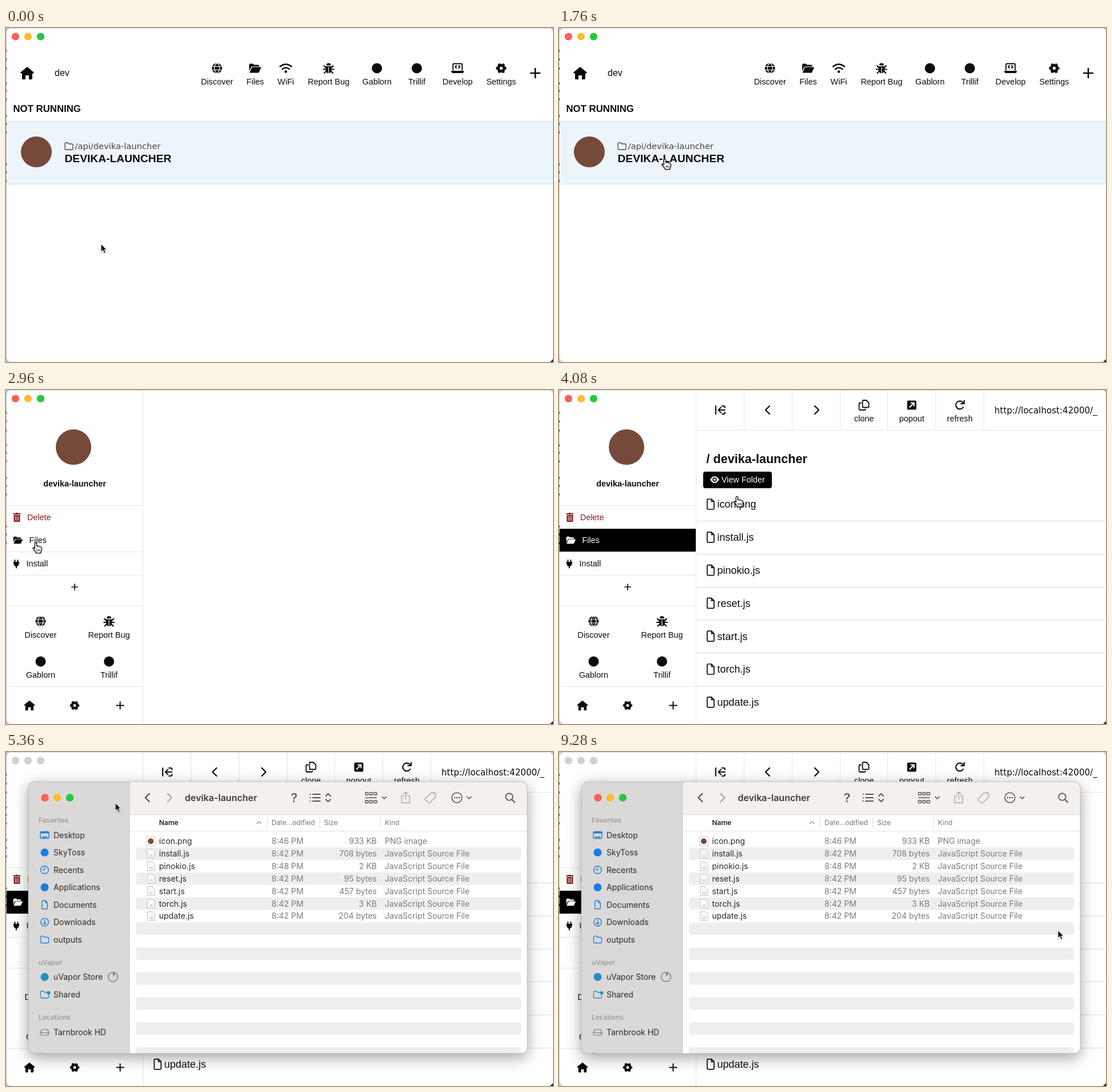
An HTML page that plays this animation: 956x585 px, repeating every 9360 ms.

```html
<!DOCTYPE html>
<html lang="en">
<head>
<meta charset="utf-8">
<title>Launcher file browser</title>
<style>
html, body { margin: 0; width: 100%; height: 100%; overflow: hidden; background: #fff; }
svg { display: block; width: 956px; height: 585px; }
text { white-space: pre; }
.ui { font-family: "Liberation Sans", Arial, sans-serif; }
.wide { font-family: "DejaVu Sans", Verdana, sans-serif; }
.mac { font-family: Inter, Roboto, sans-serif; }
#finder { filter: drop-shadow(0 7px 13px rgba(0,0,0,.36)); }
#cursor { filter: drop-shadow(0 1px 1px rgba(0,0,0,.3)); }
</style>
</head>
<body>
<svg id="stage" viewBox="0 0 956 585" xmlns="http://www.w3.org/2000/svg"></svg>
<script>
const LOOP = 9360, STEP = 80;
const INK = '#0c0c0c', RED = '#84201a', BLUE = '#1c7ce0', CYAN = '#258fc4', GRAY = '#55524f', PALE = '#aaa7a5';
const AVATAR = '#754a3a';

const fill = d => `<path d="${d}" fill="currentColor"/>`;
const line = (d, w = 2) =>
  `<path d="${d}" fill="none" stroke="currentColor" stroke-width="${w}" stroke-linecap="round" stroke-linejoin="round"/>`;
const ring = (r, w, extra = '') =>
  `<circle r="${r}" fill="none" stroke="currentColor" stroke-width="${w}" ${extra}/>`;

const FOLDER = 'M-7-4.5Q-7-6-5.5-6H-2L0-4H5.5Q7-4 7-2.5V4.5Q7 6 5.5 6H-5.5Q-7 6-7 4.5Z';
const PAGE = 'M-6-7.5Q-6-9-4.5-9H1.5L6-4.5V7.5Q6 9 4.5 9H-4.5Q-6 9-6 7.5ZM1.5-9V-4.5H6';
const icons = {
  home: fill('M0-11L12-1 10.3 1 9-.1V9.5Q9 11 7.5 11H3V4H-3V11H-7.5Q-9 11-9 9.5V-.1L-10.3 1-12-1Z'),
  globe: '<circle r="9" fill="currentColor"/><path d="M-9-3H9M-9 3H9M0-9C-6-5-6 5 0 9C6 5 6-5 0-9" fill="none" stroke="#fff" stroke-width="1.2"/>',
  open: fill('M-10.5 5V-6Q-10.5-8-8.5-8H-4L-2-6H5Q7-6 7-4V-3H-5Q-6.5-3-7.2-1.6ZM-10 8L-6-1Q-5.6-2-4.5-2H9.5Q10.8-2 10.2-.8L6.8 6.8Q6.2 8 5 8Z'),
  wifi: line('M-10-3Q0-11 10-3M-6 1.5Q0-3.5 6 1.5', 2.5) + '<circle cy="6" r="2.3" fill="currentColor"/>',
  bug: fill('M-4-5A4 4 0 0 1 4-5ZM-5-3.5H5V3A5 6 0 0 1-5 3Z') +
    line('M-5-1L-8-4.5M5-1L8-4.5M-5 2H-9M5 2H9M-4 5L-7.5 8.5M4 5L7.5 8.5') +
    '<path d="M0-2V9" stroke="#fff" stroke-width="1.2"/>',
  dot: '<circle r="9" fill="currentColor"/>',
  laptop: line('M-8 3V-6.5Q-8-8-6.5-8H6.5Q8-8 8-6.5V3M-2-4.5L-4-2.5-2-.5M2-4.5L4-2.5 2-.5', 1.9) +
    fill('M-11 4.5H11Q11 8.5 8 8.5H-8Q-11 8.5-11 4.5Z'),
  gear: ring(5.2, 4.8) + ring(7.7, 2.8, 'stroke-dasharray="4.03" stroke-dashoffset="2"'),
  plus: line('M-8 0H8M0-8V8', 2.6),
  trash: fill('M-6.5-7H-2.5L-1.5-8H1.5L2.5-7H6.5V-5H-6.5ZM-5.5-4H5.5V6.5Q5.5 8 4 8H-4Q-5.5 8-5.5 6.5Z') +
    '<path d="M-2.5-2V6M0-2V6M2.5-2V6" stroke="#fff" stroke-width=".9"/>',
  plug: line('M-2.5-6.5V-3M2.5-6.5V-3M0 3V7', 2) + fill('M-5.5-3.5H5.5V-2H4.7V0Q4.2 4.2 0 4.2T-4.7 0V-2H-5.5Z'),
  folder: line(FOLDER, 1.3),
  page: line(PAGE, 1.7),
  exit: line('M-8-7V7M-3 0H8M1-4.5L-3.5 0 1 4.5M3-7H6Q8-7 8-5V-4M3 7H6Q8 7 8 5V4', 2),
  left: line('M3.5-7L-3.5 0 3.5 7', 2.3),
  right: line('M-3.5-7L3.5 0-3.5 7', 2.3),
  down: line('M-3.5-1.5L0 2 3.5-1.5', 1.7),
  clone: line('M-2-8.5H4L8.5-4V2.5Q8.5 4 7 4H-1Q-2.5 4-2.5 2.5V-7Q-2.5-8.5-1-8.5M-5-4H-7Q-8.5-4-8.5-2.5V7Q-8.5 8.5-7 8.5H1Q2.5 8.5 2.5 7', 1.8),
  popout: '<rect x="-8" y="-8" width="16" height="16" rx="2" fill="currentColor"/><path d="M-4 4L3-3M-2-4H4V2" fill="none" stroke="#fff" stroke-width="2"/>',
  refresh: line('M6 3.5A7 7 0 1 1 5-5L7-3M7.5-8V-2.5H2', 2.1),
  eye: fill('M-8 0Q-4-6 0-6T8 0Q4 6 0 6T-8 0Z') + '<circle r="3.7" fill="#000"/><circle r="2.1" fill="currentColor"/>',
  desktop: line('M-7.5-4Q-7.5-6-5.5-6H5.5Q7.5-6 7.5-4V4Q7.5 6 5.5 6H-5.5Q-7.5 6-7.5 4Z', 1.4) + fill('M-7-5.5H7V-3H-7ZM-5 2.5H5V4.5H-5Z'),
  clock: ring(6.8, 1.4) + line('M0-4V0H-3.2', 1.3),
  fetch: ring(6.8, 1.4) + line('M0-3.5V3.5M-2.8 1L0 3.7 2.8 1', 1.3),
  disk: line('M-7.5 1L-5-4.5H5L7.5 1V4Q7.5 5.5 6 5.5H-6Q-7.5 5.5-7.5 4V1H7.5M4 3.2H5', 1.2),
  list: line('M-4-6H9M-4 0H9M-4 6H9M-8.5-6H-8M-8.5 0H-8M-8.5 6H-8', 1.8),
  updown: line('M-4-3L0-7 4-3M-4 3L0 7 4 3', 1.8),
  share: line('M-3-3H-7V9H7V-3H3M0 3V-10M-4-6.5L0-10 4-6.5', 1.5),
  tag: line('M-9 2L1-8 8.5-9 9.5-1.5-1 9Q-2 10-3 9L-9 4Q-10 3-9 2ZM5.5-5.5H5.6', 1.5),
  more: ring(8.8, 1.6) + line('M-4 0H-3.9M0 0H.1M4 0H4.1', 2.4),
  search: '<circle cx="-1.5" cy="-1.5" r="6.2" fill="none" stroke="currentColor" stroke-width="1.8"/>' + line('M3.2 3.2L8 8'),
  group: [-7, 0, 7].map(y => [-7.5, 0, 7.5].map(x => y
    ? `<rect x="${x - 2.5}" y="${y - 2.3}" width="5" height="4.6" rx="1" fill="none" stroke="currentColor" stroke-width="1.4"/>` : '').join('')).join('') +
    line('M-9.5 0H9.5', 1.3)
};

const icon = (name, x, y, scale = 1, color = INK) =>
  `<g transform="translate(${x} ${y}) scale(${scale})" color="${color}">${icons[name]}</g>`;
const text = (x, y, size, str, { font = 'ui', color = INK, anchor = 'start', weight = 400 } = {}) =>
  `<text class="${font}" x="${x}" y="${y}" font-size="${size}" fill="${color}" text-anchor="${anchor}" font-weight="${weight}">${str}</text>`;
const label = (x, y, str) => text(x, y, 14.4, str, { anchor: 'middle' });
const box = (x, y, w, h, color, r = 0) => `<rect x="${x}" y="${y}" width="${w}" height="${h}" rx="${r}" fill="${color}"/>`;
const rule = (x, y, w, color = '#e4e4e4') => box(x, y, w, 1, color);
const bar = (x, y, h, color = '#e4e4e4') => box(x, y, 1, h, color);
const disc = (x, y, r, color) => `<circle cx="${x}" cy="${y}" r="${r}" fill="${color}"/>`;
const group = (id, body) => `<g id="${id}">${body}</g>`;

function homeView() {
  const links = [['globe', 'Discover', 368.7], ['open', 'Files', 435.5], ['wifi', 'WiFi', 489], ['bug', 'Report Bug', 563.8],
    ['dot', 'Gablorn', 648.3], ['dot', 'Trillif', 718], ['laptop', 'Develop', 789.2], ['gear', 'Settings', 865.5]];
  return icon('home', 37, 79) + text(85, 84, 16, 'dev') +
    links.map(([name, str, x]) => icon(name, x, 70.5) + label(x, 99, str)).join('') +
    icon('plus', 925, 79) + text(12.5, 147, 16.8, 'NOT RUNNING', { weight: 700 }) +
    box(1, 163, 955, 111, '#ecf5fa') + rule(1, 163, 955, '#c3e2f1') + rule(1, 273, 955, '#c3e2f1') +
    disc(53, 217, 27, AVATAR) + icon('folder', 110, 207, 1, '#444') +
    text(120.5, 212, 14.65, '/api/devika-launcher', { font: 'wide', color: '#444' }) +
    text(102.5, 235, 19.2, 'DEVIKA-LAUNCHER', { weight: 700 });
}

function sideView() {
  const links = [['globe', 'Discover', 60.5, 405], ['bug', 'Report Bug', 180, 405], ['dot', 'Gablorn', 60.5, 475.5], ['dot', 'Trillif', 180, 475.5]];
  return bar(239, 0, 585) + disc(118, 100, 31, AVATAR) +
    text(120, 168.5, 14.4, 'devika-launcher', { weight: 700, anchor: 'middle' }) +
    [202, 283, 324, 378, 519].map(y => rule(1, y, 238)).join('') +
    icon('trash', 19, 223, 1, RED) + text(37, 227.5, 14.4, 'Delete', { color: RED }) +
    group('filesIdle', icon('open', 21, 263, .78) + text(40.5, 268, 14.4, 'Files')) +
    group('filesActive', box(1, 243, 238, 40, '#000') + icon('open', 21, 263, .78, '#fff') + text(40.5, 268, 14.4, 'Files', { color: '#fff' })) +
    icon('plug', 18, 304.5) + text(35.5, 309, 14.4, 'Install') + icon('plus', 120, 345, .65) +
    links.map(([name, str, x, y]) => icon(name, x, y) + label(x, y + 28.5, str)).join('') +
    icon('home', 41, 552.5, .8) + icon('gear', 120, 552.5, .9) + icon('plus', 199.5, 552.5, .78);
}

const names = ['icon.png', 'install.js', 'pinokio.js', 'reset.js', 'start.js', 'torch.js', 'update.js'];

function filesView() {
  const tools = [['clone', 533], ['popout', 616.5], ['refresh', 700.5]];
  return [323, 407, 491, 574, 658, 742].map(x => bar(x, 0, 70)).join('') + rule(240, 70, 716) +
    icon('exit', 282, 35) + icon('left', 364.5, 35) + icon('right', 450.5, 35) +
    tools.map(([name, x]) => icon(name, x, 26.5) + label(x, 55, name)).join('') +
    text(761, 40.5, 15.1, 'http://localhost:42000/_', { font: 'wide' }) +
    text(257.5, 127.5, 21.6, '/ devika-launcher', { weight: 700 }) +
    box(252, 143, 120, 29, '#000', 4) + icon('eye', 272, 157, 1, '#fff') + text(284, 162, 14.4, 'View Folder', { color: '#fff' }) +
    names.map((name, i) => {
      const y = 200 + i * 57.8;
      return icon('page', 265, y, 1) + text(276.5, y + 6.3, 18, name) + (i < 6 ? rule(240, Math.round(y + 29), 716, '#dadada') : '');
    }).join('');
}

function finderView() {
  const mac = (x, y, size, str, color = '#2b2928', opts = {}) => text(x, y, size, str, { font: 'mac', color, ...opts });
  const places = [['desktop', 'Desktop', 145.5], ['dot', 'SkyToss', 176], ['clock', 'Recents', 206.5], ['dot', 'Applications', 237],
    ['page', 'Documents', 267.5], ['fetch', 'Downloads', 298], ['folder', 'outputs', 328.5], ['dot', 'uVapor Store', 394, CYAN],
    ['folder', 'Shared', 425, CYAN], ['disk', 'Tarnbrook HD', 490.5, '#777']];
  const shrink = { dot: .78, page: .8 };
  const details = [['8:46', '933 KB'], ['8:42', '708 bytes'], ['8:48', '2 KB'], ['8:42', '95 bytes'], ['8:42', '457 bytes'], ['8:42', '3 KB'], ['8:42', '204 bytes']];
  const pitch = 21.87, stripes = [];
  for (let i = 1; i < 18; i += 2) stripes.push(box(227, 145.3 + i * pitch, 673.5, 21.9, '#efeeee', 5));

  const rows = names.map((name, i) => {
    const y = 156.2 + i * pitch, soft = '#7d7b7a';
    const mini = i ? `<path d="M247 ${y - 8}h9l4 4v12h-13z" fill="#f7f7f7" stroke="#c4c4c4"/>` + mac(253.5, y + 5.5, 5, 'JS', '#999', { anchor: 'middle' })
      : `<rect x="245.5" y="${y - 8}" width="15" height="16" fill="#fff" stroke="#ccc"/>` + disc(253, y, 5, AVATAR);
    return mini + mac(267.5, y + 5, 14, name) + mac(464, y + 5, 14, details[i][0] + ' PM', soft) +
      mac(648, y + 5, 14, details[i][1], soft, { anchor: 'end' }) + mac(662, y + 5, 14, i ? 'JavaScript Source File' : 'PNG image', soft);
  }).join('');

  return '<clipPath id="frame"><rect x="39" y="52" width="872" height="476" rx="11"/></clipPath><g clip-path="url(#frame)">' +
    box(39, 52, 872, 476, '#fff') + box(39, 52, 177, 476, '#dbd9d8') + box(216, 52, 695, 57, '#f3f0ee') + bar(215.5, 52, 476, '#cbc9c8') +
    rule(216, 109, 695, '#dddbda') + rule(216, 138, 695, '#e2e2e2') +
    disc(68, 80, 6.8, '#fe5f57') + disc(89.5, 80, 6.8, '#febc2e') + disc(111.5, 80, 6.8, '#28c840') +
    [['Favorites', 124], ['uVapor', 373], ['Locations', 469], ['Tags', 536]].map(([str, y]) => mac(57, y, 11.8, str, '#a09d9c', { weight: 600 })).join('') +
    places.map(([name, str, y, color = BLUE]) => icon(name, 67.5, y, shrink[name] || 1, color) + mac(83, y + 5, 14, str)).join('') +
    disc(74.5, 422, 3, CYAN) +
    `<g transform="translate(187 394)" color="#777">${ring(8.3, 1.4)}${fill('M0 0V-7A7 7 0 0 1 4-5.8Z')}</g>` +
    icon('left', 247, 80, 1, GRAY) + icon('right', 286, 80, 1, PALE) + mac(312.5, 86, 16, 'devika-launcher', '#3e3b39', { weight: 600 }) +
    mac(503.5, 88, 22, '?', GRAY, { anchor: 'middle', weight: 500 }) + icon('list', 540, 80, 1, GRAY) + icon('updown', 563, 80, 1, GRAY) +
    icon('group', 638, 80, 1, GRAY) + icon('down', 661, 80, 1, GRAY) + icon('share', 698.5, 80, 1, PALE) + icon('tag', 741.5, 80, 1, PALE) +
    icon('more', 788, 80, 1, GRAY) + icon('down', 809.5, 80, 1, GRAY) + icon('search', 881, 80, 1, GRAY) +
    mac(267.5, 127.5, 12, 'Name', '#222', { weight: 600 }) + `<path d="M438 126l4-4 4 4" fill="none" stroke="#888" stroke-width="1.2"/>` +
    [[464, 'Date…odified'], [556, 'Size'], [662, 'Kind']].map(([x, str]) => mac(x, 127.5, 12, str, '#777') + bar(x === 464 ? 456 : x - 8, 114, 20, '#dcdcdc')).join('') +
    stripes.join('') + rows + '</g><rect x="39" y="52" width="872" height="476" rx="11" fill="none" stroke="#aaa" stroke-width=".7"/>';
}

// Sliver of the desktop visible around the window edge.
const edges = '<path d="M0 0H956V585H0ZM1 10V575Q1 585 11 585H947Q956 585 956 576V9Q956 0 947 0H11Q1 0 1 10Z" fill="#c9c9c9" fill-rule="evenodd"/>' +
  rule(10, 0, 937, '#d9d9d9') + '<path d="M956 580V585H951Z" fill="#222"/>' +
  [38, 53, 69, 95, 108, 123, 152, 166, 181, 237, 251, 266].map(y => box(0, y, 1, 4, '#222')).join('');

document.getElementById('stage').innerHTML = box(0, 0, 956, 585, '#fff') +
  group('home', homeView()) + group('side', sideView()) + group('files', filesView()) + edges +
  group('lights', [16.5, 38.5, 60.5].map(x => disc(x, 15, 6.6, '#000')).join('')) +
  group('finder', finderView()) +
  group('cursor',
    group('arrow', '<path d="M0 0V14.5L3.3 11.3 5.6 16.6 8.2 15.5 6 10.4H10.4Z" fill="#000" stroke="#fff" stroke-width="1.1"/>') +
    group('hand', '<path d="M-1.6 1.5Q0-.8 1.6 1.5V6.5Q3.5 5.6 4.6 7Q6.5 6.2 7.6 7.8Q10 7.4 10.4 9.6V13Q10 15.5 8.6 17V18.5H.4V17.2L-4.8 10.6Q-5.4 8.6-3.4 8.8L-1.6 10.6Z" fill="#fff" stroke="#000" stroke-width="1.2"/><path d="M2.2 12V15.5M4.7 12V15.5M7.2 12V15.5" stroke="#000"/>'));

const el = id => document.getElementById(id);
const show = (id, on) => el(id).setAttribute('display', on ? 'inline' : 'none');

// Pointer stops: time, x, y.
const path = [[0, 166, 378], [480, 166, 378], [1360, 185, 229], [2400, 185, 229], [2960, 52, 267], [3360, 52, 267],
  [4080, 311, 186], [4240, 312, 158], [4400, 312, 158], [5120, 191, 89], [8400, 191, 89], [9280, 872, 312], [LOOP, 872, 312]];

function pointer(t) {
  const i = path.findIndex(stop => stop[0] > t);
  const [t0, x0, y0] = path[i - 1], [t1, x1, y1] = path[i];
  const u = (t - t0) / (t1 - t0), e = u * u * (3 - 2 * u);
  return [x0 + (x1 - x0) * e, y0 + (y1 - y0) * e];
}

function render(ms) {
  const t = Math.floor((ms % LOOP) / STEP) * STEP;
  const inApp = t >= 1840, browsing = t >= 3200, finder = t >= 4320;
  const [x, y] = pointer(t);
  const hand = !finder && y < 273;
  show('home', !inApp);
  show('side', inApp);
  show('filesIdle', !browsing);
  show('filesActive', browsing);
  show('files', browsing);
  show('finder', finder);
  show('hand', hand);
  show('arrow', !hand);
  [...el('lights').children].forEach((light, i) =>
    light.setAttribute('fill', finder ? '#d1d0d0' : ['#fe5f57', '#febc2e', '#28c840'][i]));
  el('cursor').setAttribute('transform', `translate(${x.toFixed(1)} ${y.toFixed(1)})`);
}

const start = performance.now();
function tick() {
  render(performance.now() - start);
  requestAnimationFrame(tick);
}
tick();
</script>
</body>
</html>
```
